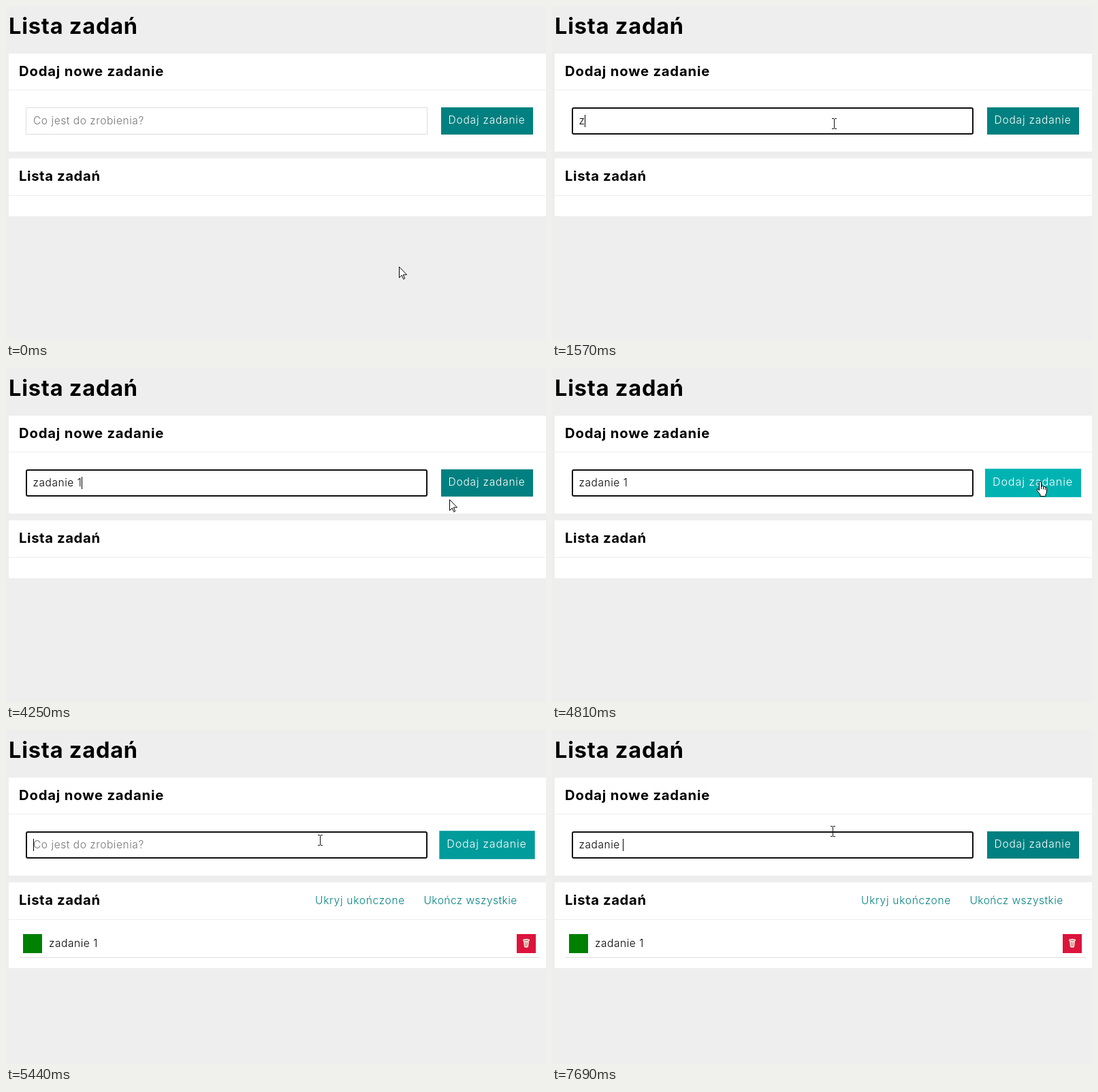
Write an HTML page that moves like this. It is 793x491 px and loops after 8 s.

```html
<!DOCTYPE html>
<html lang="pl">
<head>
<meta charset="utf-8">
<title>Lista zadań</title>
<style>
  html, body { margin: 0; width: 100%; height: 100%; overflow: hidden; background: #eee; }
  svg { display: block; }
  text { font: 350 15.5px Inter, "Open Sans", sans-serif; font-optical-sizing: none; letter-spacing: .55px; white-space: pre; }
  .title { font-size: 32.5px; font-weight: 700; letter-spacing: .8px; }
  .section { font-size: 20.3px; font-weight: 700; letter-spacing: .8px; }
  .link { fill: teal; }
  .line { shape-rendering: crispEdges; }
</style>
</head>
<body>
<svg width="793" height="491" viewBox="0 0 793 491">
  <rect width="793" height="491" fill="#eee"/>
  <text class="title" x="4" y="41">Lista zadań</text>

  <rect x="4" y="70" width="789" height="144" fill="#fff"/>
  <text class="section" x="19" y="103">Dodaj nowe zadanie</text>
  <rect x="4" y="123" width="789" height="1" fill="#eee"/>
  <rect id="border" x="29.5" y="149.5" width="589" height="39" fill="#fff" stroke="#ddd"/>
  <rect id="focus" x="30" y="150" width="588" height="38" rx="2" fill="#fff" stroke="#101010" stroke-width="2"/>
  <text id="hint" x="40" y="174" fill="#757575">Co jest do zrobienia?</text>
  <text id="typed" x="39.5" y="174"></text>
  <rect id="caret" class="line" y="160" width="1" height="18"/>
  <g id="button">
    <rect id="face" x="639" y="149" width="135" height="40"/>
    <text x="649.5" y="173" fill="#fff" style="letter-spacing:.8px">Dodaj zadanie</text>
  </g>

  <rect id="panel" x="4" y="224" width="789" height="85" fill="#fff"/>
  <text class="section" x="19" y="257" style="letter-spacing:.6px">Lista zadań</text>
  <rect x="4" y="278" width="789" height="1" fill="#eee"/>
  <g id="task">
    <text class="link" x="454" y="256" style="letter-spacing:.72px">Ukryj ukończone</text>
    <text class="link" x="613.5" y="256" style="letter-spacing:.46px">Ukończ wszystkie</text>
    <rect x="25" y="300" width="28" height="28" fill="green"/>
    <text x="63" y="319">zadanie 1</text>
    <rect x="750" y="300" width="28" height="28" fill="crimson"/>
    <path d="M759 308q5-2 10 0v2h-1l-1 9q-3 2-6 0l-1-9h-1z" fill="#f3dfd6"/>
    <path d="M761 309.5h6M762.7 312l.4 6M765.3 312l-.4 6" fill="none" stroke="#b0483f" stroke-width=".8"/>
    <rect x="19" y="334" width="765" height="1" fill="#ddd"/>
  </g>

  <g id="arrow" fill="#fff" stroke="#000">
    <path d="M.5.5V16.5L4.2 12.8 6.7 18.5 8.7 17.6 6.3 12H11.5Z"/>
  </g>
  <g id="beam" class="line" fill="none" stroke="#111">
    <path d="M-3-7.5h3M1-7.5h3M.5-7V7M-3 7.5h3M1 7.5h3"/>
  </g>
  <g id="hand" fill="#fff" stroke="#000" stroke-linejoin="round">
    <path d="M-1.5 13V1.5q0-1.5 1.5-1.5t1.5 1.5V7q2.3-1.3 3 .6 2-.9 2.8.8 2.2-.5 2.2 1.8V15q0 2-1.5 3.5v3H0v-2.5l-4.7-6q-.8-2.3 1.3-2.2z"/>
    <path d="M1.5 7v4M4.5 8v3.5M7.3 8.8V12" fill="none"/>
  </g>
</svg>
<script>
const LOOP = 8000, STEP = 70, BLINK = 535;
const WORD = "zadanie 1";
const FOCUSED = 790, ADDED = 5020;
const el = id => document.getElementById(id);
const [border, focus, hint, typed, caret, button, face, panel, task] =
  ["border", "focus", "hint", "typed", "caret", "button", "face", "panel", "task"].map(el);
const pointers = { arrow: el("arrow"), beam: el("beam"), hand: el("hand") };

const home = { x: 577, y: 383 };
const moves = [
  { start: 0, end: 560, x: 414, y: 173, bend: 0 },
  { start: 3770, end: 3840, x: 424, y: 166, bend: 0 },
  { start: 4040, end: 4250, x: 651, y: 193, bend: 0 },
  { start: 4250, end: 4600, x: 717, y: 167, bend: 8 },
  { start: 5230, end: 5580, x: 412, y: 149, bend: 20 }
];
const firstTyping = { start: 1570, gap: 184 };
const secondTyping = { start: 6280, gap: 201 };

const ramp = (t, from, to) => Math.min(1, Math.max(0, (t - from) / (to - from)));
const easeOut = (k, power) => 1 - (1 - k) ** power;
const show = (node, on) => { node.style.display = on ? "" : "none"; };
const inside = (x, y, left, right) => x >= left && x < right && y >= 148 && y < 190;

function drawInput(t) {
  const added = t >= ADDED, focused = t >= FOCUSED;
  const { start, gap } = added ? secondTyping : firstTyping;
  const count = Math.min(WORD.length, Math.max(0, Math.floor((t - start) / gap) + 1));
  const lastEdit = count ? start + (count - 1) * gap : added ? ADDED : FOCUSED;
  typed.textContent = WORD.slice(0, count);
  show(hint, count === 0);
  show(focus, focused);
  show(border, !focused);
  show(caret, focused && Math.floor((t - lastEdit) / BLINK) % 2 === 0);
  caret.setAttribute("x", 40 + Math.round(count ? typed.getComputedTextLength() - 1 : 0));
}

function drawButton(t) {
  const hover = leave => easeOut(ramp(t, 4330, 4740), 2) - easeOut(ramp(t, leave, leave + 1000), 3);
  const scale = 1 + .045 * hover(5400);
  const shade = Math.round(128 + 51 * hover(5250));
  button.setAttribute("transform", `translate(706.5 169) scale(${scale}) translate(-706.5 -169)`);
  face.setAttribute("fill", `rgb(0,${shade},${shade})`);
}

function pointerAt(t) {
  let { x, y } = home;
  for (const move of moves) {
    const k = easeOut(ramp(t, move.start, move.end), 2);
    x += (move.x - x) * k;
    y += (move.y - y) * k + move.bend * Math.sin(Math.PI * k);
  }
  return [Math.round(x), Math.round(y)];
}

function drawPointer(t) {
  const [x, y] = pointerAt(Math.round(Math.floor((t + 20) / STEP) * STEP - 20));
  const kind = inside(x, y, 636, 777) ? "hand" : inside(x, y, 29, 619) ? "beam" : "arrow";
  for (const name in pointers) show(pointers[name], name === kind);
  pointers[kind].setAttribute("transform", `translate(${x} ${y})`);
}

function draw(t) {
  drawInput(t);
  drawButton(t);
  drawPointer(t);
  show(task, t >= ADDED);
  panel.setAttribute("height", t >= ADDED ? 126 : 85);
}

const began = performance.now();
function frame() {
  draw((performance.now() - began) % LOOP);
  requestAnimationFrame(frame);
}
frame();
</script>
</body>
</html>
```
